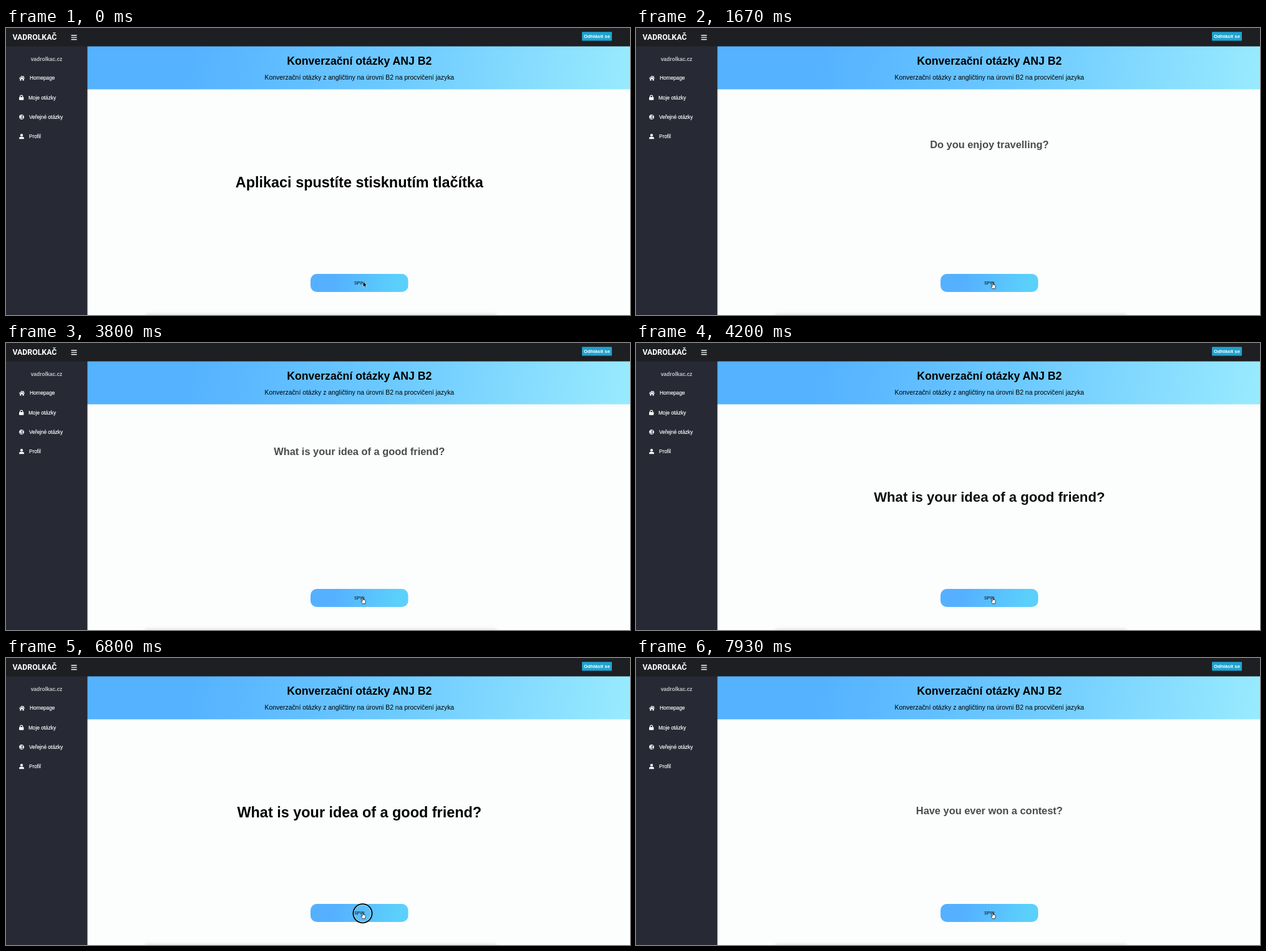
An HTML page for the animation above (8 s loop, 1000 px wide and 461 px high).

```html
<!DOCTYPE html>
<html lang="cs">
<head>
<meta charset="utf-8">
<title>Konverzační otázky</title>
<style>
  html, body { margin: 0; width: 100%; height: 100%; overflow: hidden; background: #fcfdfd; }
  svg { display: block; width: 100vw; height: 100vh; font-family: "Liberation Sans", Arial, sans-serif; }
  .mid { text-anchor: middle; }
  .bold { font-weight: 700; }
  .menu { font-size: 8.25px; fill: #fff; stroke: #fff; stroke-width: .15px; }
</style>
</head>
<body>
<svg viewBox="0 0 1000 461">
  <defs>
    <linearGradient id="sky" gradientUnits="userSpaceOnUse" x1="300" y1="30" x2="990" y2="120">
      <stop offset="0" stop-color="#55b2ff"/>
      <stop offset=".45" stop-color="#6cc9ff"/>
      <stop offset="1" stop-color="#98eafe"/>
    </linearGradient>
    <linearGradient id="key" gradientUnits="userSpaceOnUse" x1="530" y1="395" x2="625" y2="420">
      <stop offset="0" stop-color="#55b1ff"/>
      <stop offset="1" stop-color="#5bd0fb"/>
    </linearGradient>
    <filter id="soft" x="-5%" y="-100%" width="110%" height="300%">
      <feGaussianBlur stdDeviation="2"/>
    </filter>
  </defs>

  <rect width="1000" height="461" fill="#fcfdfd"/>
  <rect x="222" y="458.5" width="565" height="12" rx="5" fill="#e6e7e7" filter="url(#soft)"/>

  <!-- page header -->
  <rect x="130" y="29" width="870" height="69.5" fill="url(#sky)"/>
  <text class="mid bold" x="566.3" y="59" font-size="17.7">Konverzační otázky ANJ B2</text>
  <text class="mid" x="566.3" y="83" font-size="10.42">Konverzační otázky z angličtiny na úrovni B2 na procvičení jazyka</text>

  <!-- spin button -->
  <rect x="488" y="395" width="156.5" height="29" rx="10" fill="url(#key)"/>
  <text class="mid" x="566.3" y="412" font-size="7.1">SPIN</text>

  <g id="question"><text class="mid bold" y="8.2" font-size="23.43"></text></g>

  <!-- sidebar -->
  <rect y="29" width="130.5" height="432" fill="#272934"/>
  <text class="mid bold" x="65" y="53" font-size="8.45" fill="#c3c4c8">vadrolkac.cz</text>
  <g class="menu">
    <text x="38" y="83.3">Homepage</text>
    <text x="36" y="114.7">Moje otázky</text>
    <text x="37" y="146">Veřejné otázky</text>
    <text x="37" y="177.3">Profil</text>
  </g>
  <g fill="#fff">
    <path d="M20.8 80.8 25.5 76.6 27.5 78.4V77.2H28.8V79.6L30.2 80.8 29.6 81.5 25.5 77.9 21.4 81.5ZM22.3 81.6 25.5 78.8 28.7 81.6V84.4H26.5V82H24.5V84.4H22.3Z"/>
    <rect x="21" y="111" width="7.4" height="4.8" rx=".8"/>
    <path d="M22.7 111.4V110.2a2 2 0 0 1 4 0V111.4" fill="none" stroke="#fff" stroke-width="1.2"/>
    <circle cx="25" cy="143" r="3.6" fill="none" stroke="#fff" stroke-width="1"/>
    <path d="M22 141.2 24.5 140 25.8 141 24.6 142.6 25.6 143.8 24.4 146.2 23.2 144.2 21.8 143ZM26.8 141.2 28.2 142V144L27 145 26 143Z"/>
    <circle cx="25" cy="172.2" r="2.1"/>
    <path d="M21.1 178.2V177a2.3 2.3 0 0 1 2.3-2.2H26.6a2.3 2.3 0 0 1 2.3 2.2V178.2Z"/>
  </g>

  <!-- top bar -->
  <rect width="1000" height="29.5" fill="#1d1f23"/>
  <text class="bold" x="10.5" y="19.2" font-size="12.3" fill="#fff" style="font-family:Roboto,sans-serif">VADROLKAČ</text>
  <path d="M104.5 11.7H113.5M104.5 15.1H113.5M104.5 18.5H113.5" stroke="#fff" stroke-width="1.4"/>
  <rect x="923" y="6.3" width="48" height="14.2" rx="1" fill="#20a3d0"/>
  <text class="mid bold" x="947" y="16.3" font-size="7.8" fill="#fff">Odhlásit se</text>

  <!-- pointer -->
  <g id="ring" fill="none">
    <circle cx="571.5" cy="410.3" r="13.8" stroke="#fff" stroke-opacity=".6"/>
    <circle cx="571.5" cy="410.3" r="15.1" stroke="#000" stroke-width="1.8"/>
  </g>
  <path id="arrow" d="M572.3 407V416.2L574.3 414.3 575.6 417.2 577.1 416.5 575.8 413.7H578.5Z" fill="#000" stroke="#fff" stroke-width=".6"/>
  <path id="hand" d="M571 409.2a.8.8 0 0 1 1.6 0V412.2L575.4 412.9Q576.5 413.2 576.3 414.6L575.5 418.8H571.3L569.1 415.4Q568.7 414.3 569.8 414.2L571 415.2Z" fill="#fff" stroke="#111" stroke-width=".75"/>
</svg>
<script>
const LOOP = 8000, FRAME = 1000 / 15;
const CENTER = { x: 566.3, y: 247.5 };
const SMALL = 0.7, RISE = -780, DROP = 455;
const SHRINK = 200, DROP_TIME = 1600, EXIT_DELAY = 98, EXIT_END = 463, PRESS = 130;

const opening = "Aplikaci spustíte stisknutím tlačítka";
const spins = [
  { click: 665, enter: 1136, fall: 800, grow: 200, text: "Do you enjoy travelling?" },
  { click: 2865, enter: 3370, fall: 680, grow: 290, text: "What is your idea of a good friend?" },
  { click: 6799, enter: 7390, fall: 584, grow: 200, text: "Have you ever won a contest?" }
];

const byId = id => document.getElementById(id);
const question = byId("question"), label = question.firstElementChild;
const ring = byId("ring"), arrow = byId("arrow"), hand = byId("hand");

// cubic-bezier(.25, .1, .25, 1)
function ease(x) {
  if (x <= 0) return 0;
  if (x >= 1) return 1;
  let lo = 0, hi = 1;
  for (let i = 0; i < 24; i++) {
    const s = (lo + hi) / 2;
    if (0.75 * s * (1 - s) + s ** 3 < x) lo = s; else hi = s;
  }
  return 0.3 * lo * (1 - lo) ** 2 + 3 * lo * lo * (1 - lo) + lo ** 3;
}

const mix = (a, b, k) => a + (b - a) * k;

function pose(t) {
  const n = spins.findLastIndex(s => t >= s.click);
  if (n < 0) return { text: opening, y: 0, size: 1 };
  const s = spins[n];
  if (t < s.click + EXIT_END) {
    const out = t - s.click - EXIT_DELAY;
    return {
      text: n ? spins[n - 1].text : opening,
      y: DROP * ease((out - SHRINK) / DROP_TIME),
      size: mix(1, SMALL, ease(out / SHRINK))
    };
  }
  const into = t - s.enter;
  return {
    text: s.text,
    y: RISE * (1 - ease(into / s.fall)),
    size: mix(SMALL, 1, ease((into - s.fall) / s.grow))
  };
}

const show = (el, on) => el.setAttribute("visibility", on ? "visible" : "hidden");

function draw(ms) {
  const t = Math.floor((ms % LOOP + 5) / FRAME) * FRAME % LOOP;
  const p = pose(t);
  if (label.textContent !== p.text) label.textContent = p.text;
  question.setAttribute("transform", `translate(${CENTER.x} ${CENTER.y + p.y}) scale(${p.size})`);
  question.setAttribute("opacity", p.size);
  show(ring, spins.some(s => t >= s.click && t < s.click + PRESS));
  show(arrow, t < 60);
  show(hand, t >= 60);
}

const start = performance.now();
function tick() {
  draw(performance.now() - start);
  requestAnimationFrame(tick);
}
tick();
</script>
</body>
</html>
```
